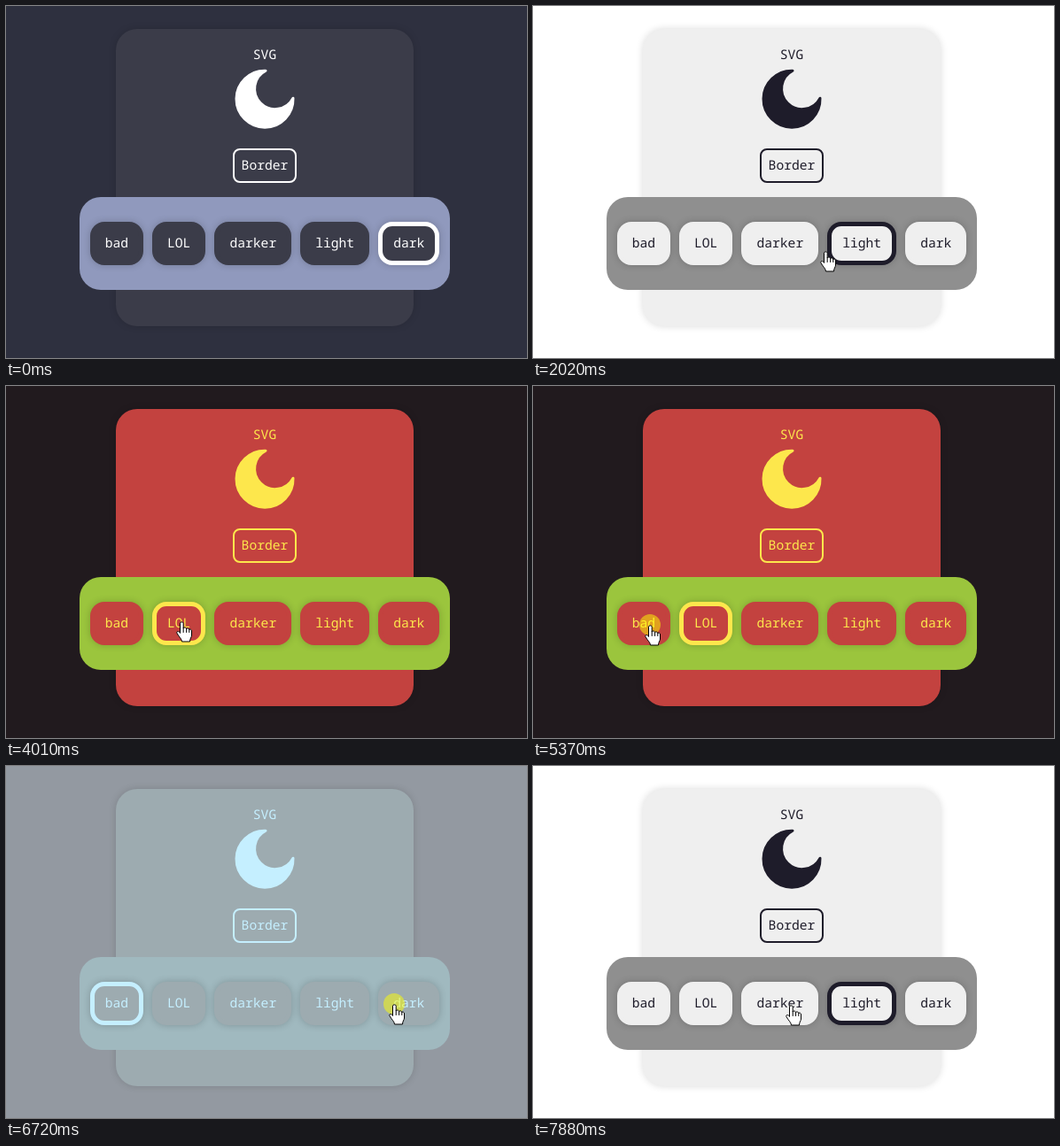
These frames come from a looping animation (588x398 px, 8000 ms). An HTML page:

```html
<!DOCTYPE html>
<html lang="en">
<head>
<meta charset="utf-8">
<title>Theme switcher</title>
<style>
  html, body { margin: 0; width: 100%; height: 100%; overflow: hidden; }
  body {
    position: relative;
    background: var(--bg);
    color: var(--accent);
    font: 14.667px "Noto Sans Mono", monospace;
    text-rendering: geometricPrecision;
  }
  div, svg { position: absolute; box-sizing: border-box; }
  .card {
    left: 124px; top: 26px; width: 336px; height: 336px;
    border-radius: 24px;
    background: var(--card);
    box-shadow: 0 0 8px rgba(0, 0, 0, .15);
  }
  .label { left: 0; width: 100%; top: 19px; line-height: 21px; text-align: center; }
  .border {
    left: 132px; top: 135px; width: 72px; height: 39px;
    border: 2px solid; border-radius: 8px;
    line-height: 35px; text-align: center;
  }
  .panel {
    left: 82.6px; top: 216px; width: 418.8px; height: 105px;
    border-radius: 24px;
    background: var(--panel);
    display: flex; justify-content: center; align-items: center; gap: 10px;
  }
  .panel span {
    height: 39px; padding: 0 12px;
    border: 5px solid var(--card); border-radius: 16px;
    line-height: 39px;
    background: var(--card);
    box-shadow: 0 0 8px rgba(0, 0, 0, .2);
  }
  .panel .on { border-color: var(--accent); }
  svg { left: 0; top: 0; }
  #moon { fill: var(--accent); stroke: var(--accent); stroke-width: 3; stroke-linejoin: round; }
  #hand { fill: #fff; stroke: #000; stroke-linejoin: round; stroke-linecap: round; }
</style>
</head>
<body>
<div class="card">
  <div class="label">SVG</div>
  <div class="border">Border</div>
</div>
<div class="panel">
  <span>bad</span><span>LOL</span><span>darker</span><span>light</span><span>dark</span>
</div>
<svg width="588" height="398">
  <path id="moon" d="M293 73.2A32 32 0 1 0 324 104.2A23 23 0 1 1 293 73.2z"/>
  <g id="pointer">
    <circle id="click" r="12" fill="#ff0" fill-opacity=".5"/>
    <path id="hand" d="M-1.5 13V2.2C-1.5 .4 2.2 .4 2.2 2.2V8C2.2 6.5 5.6 6.8 5.6 8.6C6 7.4 8.8 7.8 8.8 9.6C9.2 8.6 11.5 9 11.5 11V16C11.5 18 9.5 19.5 9.5 23H.5C.5 20-3 17.5-5 13.5C-6 11.5-3.5 10.5-1.5 13zM2.2 8V12.5M5.6 8.6V12.5M8.8 9.6V12.5"/>
  </g>
</svg>
<script>
const LOOP = 8000;

// background, card, panel, accent
const themes = {
  dark: ['#2e303f', '#3b3c49', '#9099bd', '#fff'],
  light: ['#fff', '#efefef', '#8f8f8f', '#1e1c2a'],
  darker: ['#0a1128', '#1c2541', '#3a506b', '#5bc0be'],
  LOL: ['#211a1e', '#c3423f', '#9bc53d', '#fde74c'],
  bad: ['#9399a1', '#9dabb0', '#a0b9bf', '#c5efff']
};

// press time, release time, theme chosen on release
const clicks = [
  [1280, 1410, 'light'], [2570, 2720, 'darker'], [3870, 4010, 'LOL'],
  [5370, 5500, 'bad'], [6720, 6850, 'dark'], [7400, 7530, 'light']
];

// start, end, then the pointer's destination
const ENTER = 460;
const entry = [510, 386];
const moves = [
  [ENTER, 950, 376, 284], [1150, 1150, 375, 283], [1620, 2370, 293, 273],
  [3070, 3670, 198, 266], [4490, 5170, 132, 270], [5780, 6390, 438, 269],
  [6850, 7200, 371, 269], [7530, 7880, 291, 270]
];

const $ = id => document.getElementById(id);
const buttons = [...document.querySelectorAll('.panel span')];
const ease = p => p * p * (3 - 2 * p);

function pointerAt(t) {
  let [x, y] = entry;
  for (const [start, end, toX, toY] of moves) {
    if (t < start) break;
    const p = t >= end ? 1 : ease((t - start) / (end - start));
    x += (toX - x) * p;
    y += (toY - y) * p;
  }
  return [x, y];
}

let current;
function setTheme(name) {
  if (name === current) return;
  current = name;
  ['bg', 'card', 'panel', 'accent'].forEach((key, i) =>
    document.body.style.setProperty('--' + key, themes[name][i]));
  buttons.forEach(b => b.classList.toggle('on', b.textContent === name));
}

function draw(now) {
  const t = now % LOOP;
  const done = clicks.filter(([, release]) => t >= release);
  setTheme(done.length ? done[done.length - 1][2] : 'dark');

  const pressed = clicks.some(([press, release]) => t >= press && t < release);
  const [x, y] = pointerAt(t).map(Math.round);
  $('click').style.display = pressed ? '' : 'none';
  $('pointer').style.display = t < ENTER ? 'none' : '';
  $('pointer').setAttribute('transform', `translate(${x} ${y})`);
}

const began = performance.now();
function tick() {
  draw(performance.now() - began);
  requestAnimationFrame(tick);
}
tick();
</script>
</body>
</html>
```
